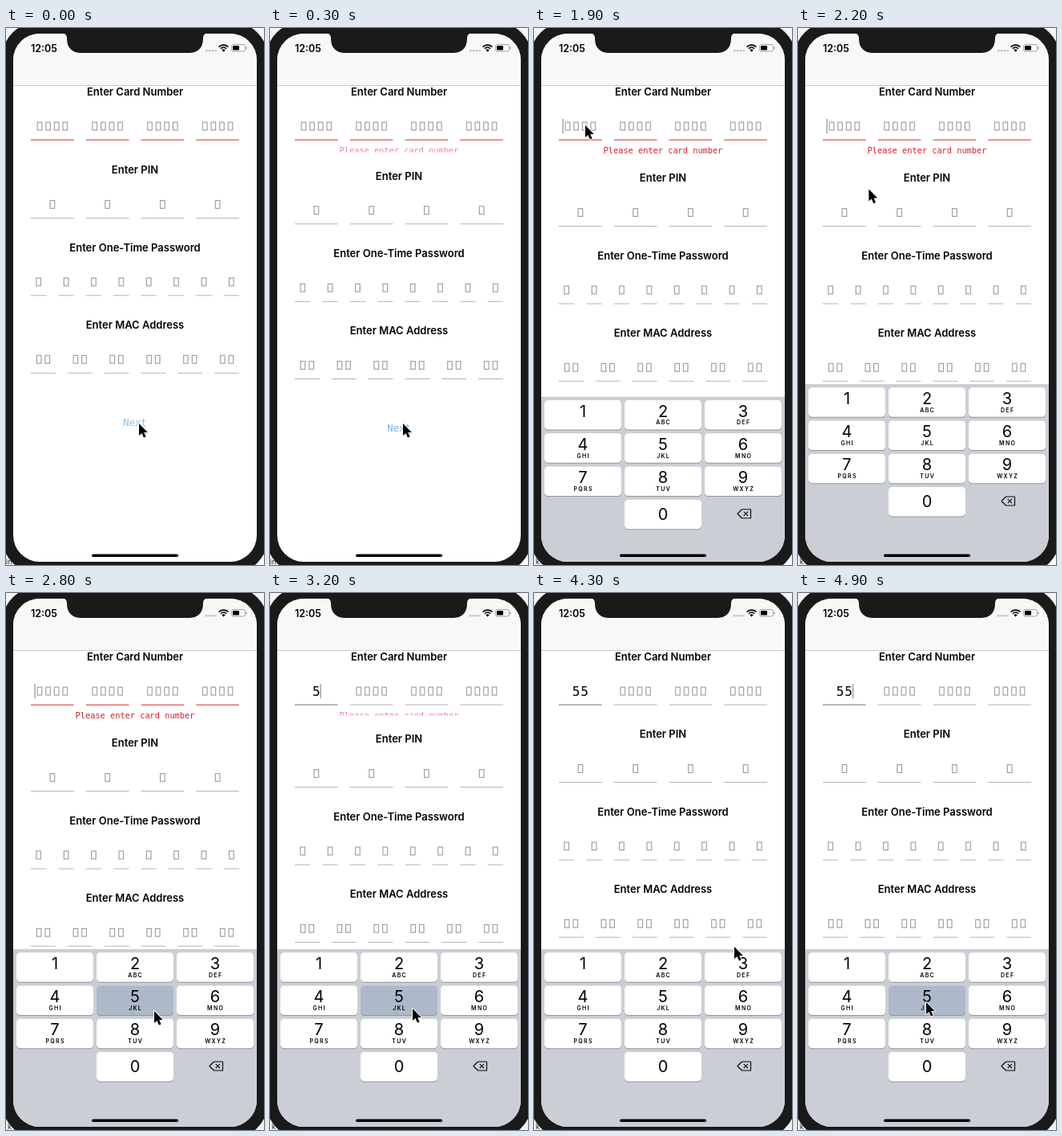
An HTML page with a canvas for the animation above (5000 ms loop, 322 by 668 pixels).

```html
<!DOCTYPE html>
<html lang="en">
<head>
<meta charset="utf-8">
<title>Card entry form</title>
<style>
  html, body { margin: 0; width: 100%; height: 100%; overflow: hidden; background: #f4f4f4; }
  canvas { display: block; width: 322px; height: 668px; }
</style>
</head>
<body>
<canvas id="stage"></canvas>
<script>
const LOOP = 5000, W = 322, H = 668;
const SANS = 'Inter, sans-serif', MONO = '"DejaVu Sans Mono", monospace';
const canvas = document.getElementById('stage');
const ctx = canvas.getContext('2d');
const scale = window.devicePixelRatio || 1;
canvas.width = W * scale;
canvas.height = H * scale;

// Pointer tip: time, x, y
const POINTER = [
  [0, 166, 492], [450, 166, 492], [950, 65, 122], [1900, 64, 121], [2000, 64, 121],
  [2700, 186, 519], [2800, 185, 520], [3100, 178, 517], [3300, 178, 517], [3600, 187, 436],
  [4000, 198, 420], [4300, 250, 440], [4500, 195, 485], [4800, 161, 508], [4900, 160, 509], [LOOP, 160, 509]
];
const FIRST_DIGIT = 2950, SECOND_DIGIT = 3400, FOCUS = 1650;
const PRESSES = [[2720, 2950], [3120, 3400], [4760, LOOP]];
const SECTIONS = [
  ['Enter Card Number', 4, 4], ['Enter PIN', 4, 1],
  ['Enter One-Time Password', 8, 1], ['Enter MAC Address', 6, 2]
];
const KEY_LETTERS = ['', 'ABC', 'DEF', 'GHI', 'JKL', 'MNO', 'PQRS', 'TUV', 'WXYZ'];

const ease = (t, from, to) => {
  const p = Math.min(1, Math.max(0, (t - from) / (to - from)));
  return p * p * (3 - 2 * p);
};

function text(str, x, y, font, color, align = 'center', spacing = 0) {
  ctx.font = font;
  ctx.fillStyle = color;
  ctx.textAlign = align;
  ctx.letterSpacing = spacing + 'px';
  ctx.fillText(str, x + spacing / 2, y);
}

function box(x, y, w, h, r, color) {
  ctx.fillStyle = color;
  ctx.beginPath();
  ctx.roundRect(x, y, w, h, r);
  ctx.fill();
}

function outline(points, close) {
  ctx.beginPath();
  points.forEach(([x, y]) => ctx.lineTo(x, y));
  if (close) ctx.closePath();
}

function drawStatusBar() {
  box(0, 0, W, 71, 0, '#f8f8f8');
  box(0, 71, W, 1, 0, '#cdcdcd');
  text('12:05', 31, 30, `600 12.5px ${SANS}`, '#000', 'left');
  for (let i = 0; i < 4; i++) box(249 + i * 3.7, 27, 2.6, 2.6, 1.3, '#bbb');

  ctx.strokeStyle = '#000';
  ctx.lineWidth = 1.7;
  for (const r of [4.8, 7.9]) {
    ctx.beginPath();
    ctx.arc(271.5, 29, r, -Math.PI * 0.76, -Math.PI * 0.24);
    ctx.stroke();
  }
  ctx.fillStyle = '#000';
  ctx.beginPath();
  ctx.moveTo(271.5, 29.5);
  ctx.arc(271.5, 29.5, 3, -Math.PI * 0.76, -Math.PI * 0.24);
  ctx.fill();

  ctx.strokeStyle = '#999';
  ctx.lineWidth = 0.9;
  ctx.beginPath();
  ctx.roundRect(281.5, 20.5, 17, 8.6, 2.4);
  ctx.stroke();
  box(283, 22, 8, 5.6, 1.2, '#000');
  box(299.4, 23.3, 1.2, 3, 0.6, '#999');
}

function drawCells(row, y, count, chars, invalid, typed) {
  const gap = 15, width = (260 - gap * (count - 1)) / count;
  for (let i = 0; i < count; i++) {
    const x = 31 + i * (width + gap), middle = x + width / 2;
    const active = row === 0 && i === 0 && typed;
    if (active) {
      for (let k = 0; k < typed.length; k++) {
        text(typed[k], middle + (k - (typed.length - 1) / 2) * 10.6, y + 49, `16px ${MONO}`, '#000');
      }
    } else {
      ctx.strokeStyle = '#a2a2a2';
      ctx.lineWidth = 1.2;
      for (let k = 0; k < chars; k++) {
        ctx.strokeRect(middle + (k - (chars - 1) / 2) * 10.6 - 2.8, y + 38.2, 5.6, 9.8);
      }
    }
    const red = row === 0 && invalid;
    box(x, y + 59.6, width, red ? 1.5 : 1, 0, red ? '#ee6b6b' : active ? '#777' : '#b4b4b4');
  }
}

function drawForm(t) {
  const typed = t < FIRST_DIGIT ? '' : t < SECOND_DIGIT ? '5' : '55';
  const open = ease(t, -110, 500) * (1 - ease(t, FIRST_DIGIT, 3490));

  SECTIONS.forEach(([title, count, chars], row) => {
    const y = 79 + row * 96.4 + (row ? 11 * open : 0);
    text(title, 161, y + 5, `600 13px ${SANS}`, '#000');
    drawCells(row, y, count, chars, !typed, typed);
  });

  ctx.save();
  ctx.beginPath();
  ctx.rect(0, 140, W, 6 + 11.5 * open);
  ctx.clip();
  ctx.globalAlpha = open * (0.7 + 0.3 * ease(t, 400, 800));
  text('Please enter card number', 161, 155 + open, `10.3px ${MONO}`, '#d31f2a');
  ctx.restore();

  ctx.globalAlpha = 0.5 + 0.5 * ease(t, 100, 800);
  text('Next', 161, 494 + 11 * open, `12.2px ${MONO}`, '#1c7fd0');
  ctx.globalAlpha = 1;

  const lastInput = t < FIRST_DIGIT ? FOCUS + 50 : t < SECOND_DIGIT ? FIRST_DIGIT : SECOND_DIGIT;
  if (t >= FOCUS && (t - lastInput) % 1050 < 600) {
    box([35.6, 62.6, 68.2][typed.length], 113, 1, 18, 0, '#777');
  }
}

function drawDeleteIcon(x, y) {
  ctx.strokeStyle = '#111';
  ctx.lineWidth = 1.2;
  ctx.lineJoin = 'round';
  outline([[x, y], [x + 5.5, y - 5.5], [x + 16.5, y - 5.5], [x + 16.5, y + 5.5], [x + 5.5, y + 5.5]], true);
  ctx.stroke();
  for (const s of [-1, 1]) {
    outline([[x + 7.8, y - 2.6 * s], [x + 13, y + 2.6 * s]]);
    ctx.stroke();
  }
}

function drawKeyboard(t) {
  if (t < FOCUS) return;
  // The slide pauses briefly before settling.
  const slideTime = t < 1890 ? 1700 : t;
  const top = 443 + (t > 2150 ? 0 : 221 * Math.exp(-(slideTime - 1600) / 114));
  const pressed = PRESSES.some(([from, to]) => t >= from && t < to);
  box(0, top, W, H, 0, '#cbced5');

  for (let n = 1; n <= 10; n++) {
    const i = n === 10 ? 10 : n - 1;
    const x = 13 + (i % 3) * 100, y = top + 4.3 + Math.floor(i / 3) * 41.2;
    const letters = KEY_LETTERS[n - 1];
    box(x, y + 1, 96, 36.5, 4.5, '#92959b');
    box(x, y, 96, 36.5, 4.5, n === 5 && pressed ? '#adb8c8' : '#fff');
    text(String(n % 10), x + 48, y + (n === 10 ? 25 : 20.5), `400 20px ${SANS}`, '#000');
    if (letters) text(letters, x + 48, y + 30.3, `600 7px ${SANS}`, '#000', 'center', 1.3);
  }
  drawDeleteIcon(254, top + 145.5);
}

function drawNotch() {
  ctx.fillStyle = '#1a1a1a';
  ctx.beginPath();
  ctx.moveTo(70, 6);
  ctx.quadraticCurveTo(76, 7, 76, 13);
  ctx.bezierCurveTo(76, 25, 83, 31, 94, 31);
  ctx.lineTo(228, 31);
  ctx.bezierCurveTo(239, 31, 246, 25, 246, 13);
  ctx.quadraticCurveTo(246, 7, 252, 6);
  ctx.fill();
}

function drawPointer(t) {
  const next = POINTER.findIndex(([time]) => time > t);
  const [t0, x0, y0] = POINTER[next - 1], [t1, x1, y1] = POINTER[next];
  const p = ease(t, t0, t1);
  ctx.save();
  ctx.translate(x0 + (x1 - x0) * p, y0 + (y1 - y0) * p);
  outline([[0, 0], [0, 15], [3.4, 11.9], [5.9, 17.6], [8.6, 16.4], [6.2, 10.9], [10.8, 10.9]], true);
  ctx.lineJoin = 'round';
  ctx.lineWidth = 1.8;
  ctx.strokeStyle = '#fff';
  ctx.stroke();
  ctx.fillStyle = '#000';
  ctx.fill();
  ctx.restore();
}

function draw(t) {
  ctx.setTransform(scale, 0, 0, scale, 0, 0);
  box(0, 0, W, H, 0, '#f4f4f4');
  text(t < 1350 ? 'in' : 'k', t < 1350 ? 0 : 2, 667, `9px ${SANS}`, '#222', 'left');
  box(-5.5, -8, 333, 687, 47, '#1a1a1a');

  ctx.save();
  ctx.beginPath();
  ctx.roundRect(9, 7, 304, 657, 33);
  ctx.clip();
  box(0, 0, W, H, 0, '#fff');
  drawStatusBar();
  drawForm(t);
  drawKeyboard(t);
  box(107, 654.5, 108, 3.6, 1.8, '#000');
  drawNotch();
  ctx.restore();

  drawPointer(t);
}

const start = performance.now();
function frame() {
  draw((performance.now() - start) % LOOP);
  requestAnimationFrame(frame);
}
frame();
</script>
</body>
</html>
```
